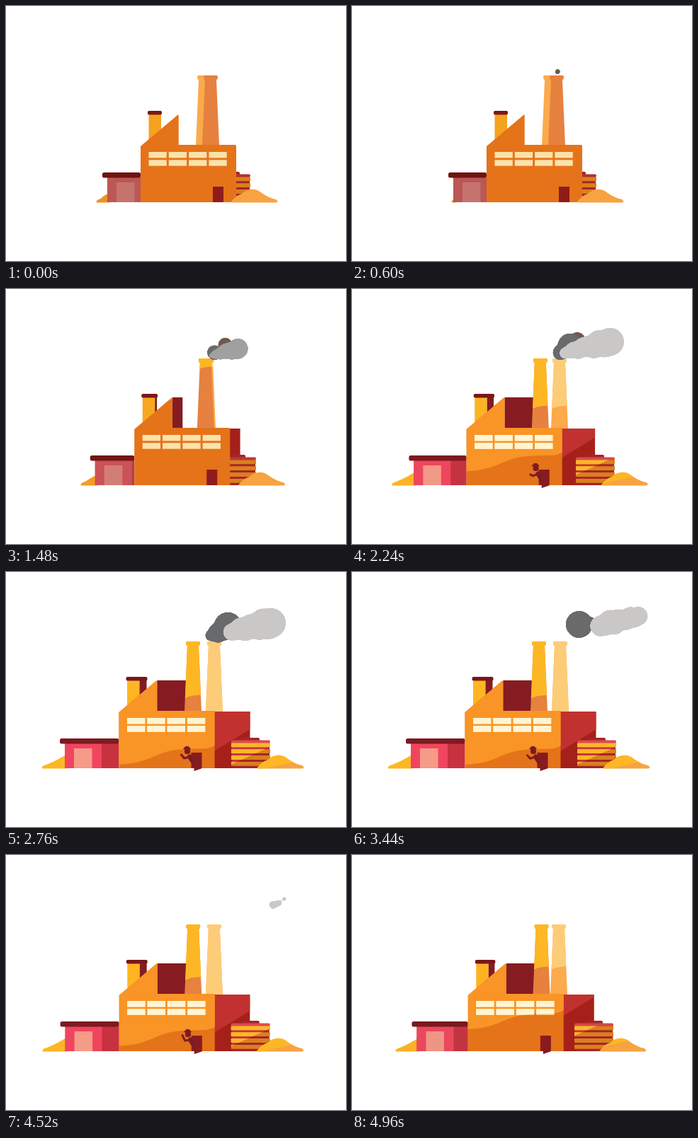
These frames come from a looping animation (480 px wide and 360 px high, 5 s). An HTML page with a canvas:

```html
<!DOCTYPE html>
<html lang="en">
<head>
<meta charset="utf-8">
<title>Factory</title>
<style>
html, body { margin: 0; width: 100%; height: 100%; overflow: hidden; background: #fff; }
canvas, svg { position: absolute; left: 0; top: 0; width: 480px; height: 360px; }
</style>
</head>
<body>
<canvas id="stage" width="480" height="360"></canvas>
<svg viewBox="0 0 480 360">
  <defs>
    <filter id="goo" filterUnits="userSpaceOnUse" x="240" y="20" width="240" height="110" color-interpolation-filters="sRGB">
      <feGaussianBlur stdDeviation="2"/>
      <feColorMatrix values="1 0 0 0 0  0 1 0 0 0  0 0 1 0 0  0 0 0 18 -8"/>
    </filter>
  </defs>
  <g id="brown" filter="url(#goo)" fill="#745750"></g>
  <g id="dark" filter="url(#goo)" fill="#696a6c"></g>
  <g id="light" filter="url(#goo)"></g>
</svg>
<script>
const LOOP = 5000;
const ctx = document.getElementById('stage').getContext('2d');

const clamp = v => Math.max(0, Math.min(1, v));
const mix = (a, b, k) => a + (b - a) * k;
const span = (t, a, b) => clamp((t - a) / (b - a));
const cubic = u => u < .5 ? 4 * u ** 3 : 1 - 4 * (1 - u) ** 3;
const smooth = u => u * u * (3 - 2 * u);

function blend(a, b, k) {
  const part = (c, i) => parseInt(c.slice(i, i + 2), 16);
  return `rgb(${[1, 3, 5].map(i => Math.round(mix(part(a, i), part(b, i), k)))})`;
}

function fill(d, color) {
  ctx.fillStyle = color;
  ctx.fill(new Path2D(d));
}

function box(x, y, w, h, color, r = 0) {
  if (w <= 0) return;
  ctx.fillStyle = color;
  ctx.beginPath();
  ctx.roundRect(x, y, w, h, r);
  ctx.fill();
}

// Shaded shape with its sunlit part above the given edge
function lit(d, dark, light, edge) {
  fill(d, dark);
  ctx.save();
  ctx.clip(new Path2D(edge));
  fill(d, light);
  ctx.restore();
}

const rect = (x, y, w, h) => `M${x} ${y}h${w}v${h}h${-w}Z`;
const slope = (x0, y0, x1, y1) => `M${x0} -200V${y0}L${x1} ${y1}V-200Z`;

function stack(c, dark, light, edgeY) {
  const d = `M${c - 9} 98H${c + 9}Q${c + 11} 100 ${c + 9} 104H${c + 8}L${c + 12} 197H${c - 12}` +
    `L${c - 8} 104H${c - 9}Q${c - 11} 100 ${c - 9} 98Z`;
  const edge = `M${c - 14} -200V${edgeY + 3}Q${c - 4} ${edgeY - 4} ${c + 14} ${edgeY - 3}V-200Z`;
  lit(d, dark, light, edge);
}

function garage(p, wall) {
  const x = mix(143, 83, p);
  box(x, 242, wall - x, 35, blend('#a8484b', '#c8313f', p));
  box(x, 242, Math.min(52, wall - x), 35, blend('#bb5755', '#f1455f', p));
  box(x + 13, 249, 25.5, 28, blend('#c5736d', '#f59b88', p));
  box(x - 7, 235, wall - x + 7, 7.5, blend('#6f1411', '#7d1a20', p), 2.5);
}

function barrels(p, drop) {
  const x = mix(291, 319, p);
  const edge = slope(x - 2, 272 - drop, x + 58, 245 - drop);
  box(x + 15, 234, 24, 6, '#a5252a', 2);
  box(x + 1, 262, 54, 15, '#a8232a');
  lit(rect(x, 238, 53, 32), '#a9242a', '#c8383c', edge);
  box(x - 1, 237.5, 55, 4, blend('#b42f30', '#dc4a50', p), 2);
  for (let i = 0; i < 4; i++)
    lit(rect(x - 1, 241.5 + i * 8.8, 55, 5.8), '#d9811b', '#fdb62a', edge);
}

function mound(p, drop) {
  const x = mix(0, 37, p);
  const d = `M${x + 319} 275Q${x + 324} 268 ${x + 333} 265C${x + 341} 257 ${x + 353} 257 ${x + 361} 264` +
    `Q${x + 371} 271 ${x + 381} 273Q${x + 386} 277 ${x + 381} 277.5H${x + 320}Q${x + 316} 277 ${x + 319} 275Z`;
  lit(d, '#f7a340', '#fdb724', slope(x + 312, 281 - drop / 2, x + 388, 264 - drop / 2));
}

function windows(x, edge) {
  for (let i = 0; i < 8; i++)
    lit(rect(x + 11.5 + i % 4 * 28.3, i < 4 ? 206 : 217.3, 25.3, 8.4), '#fbe2ab', '#fff5d4', edge);
}

function line(points, width, color) {
  ctx.strokeStyle = color;
  ctx.lineWidth = width;
  ctx.lineCap = ctx.lineJoin = 'round';
  ctx.beginPath();
  points.forEach(([x, y]) => ctx.lineTo(x, y));
  ctx.stroke();
}

function doorway(t, x) {
  const open = smooth(span(t, 1650, 2050));
  const out = smooth(span(t, 1800, 2350)) * (1 - smooth(span(t, 4450, 4950)));
  box(x, 255, 15, 22, '#8f1c1b');
  if (open <= 0) return;
  if (out > 0) {
    const skin = '#7c1c22', hx = x + 7 - 13 * out, wave = Math.sin((t - 2760) / 105);
    line([[x + 8, 275], [hx + 4, 261]], 7, skin);
    line([[hx + 3, 261], [hx - 4 * out, 263 + wave], [hx - 8 * out, 258 + 4 * wave]], 3, skin);
    box(hx - 3.5, 249, 8, 8, skin, 3.5);
    box(hx - 5, 248, 10, 2.5, skin, 1);
    box(hx - 3, 246, 6, 4, skin, 1);
  }
  const left = x + 4 * open, dip = 4 * open;
  fill(`M${left} ${255 + dip / 2}L${x + 14.5} 255V277.5L${left} ${277 + dip}Z`, '#861b20');
}

function factory(t) {
  const p = cubic(span(t, 500, 2860)) - cubic(span(t, 4220, 6480));
  const drop = 86 * (1 - p) ** .85;
  const x = mix(190, 159.5, p), r = x + 135, peak = x + 53.7, side = 50 * p;

  // Heap on the left tucks behind the shed before the turn
  const tuck = smooth(span(t, 0, 450)) * (1 - smooth(span(t, 620, 1100)));
  const heap = mix(128, 51, p) + 13 * tuck, shed = mix(146, 86, p);
  fill(`M${heap} 277.5Q${heap - 2} 274 ${heap + 6} 272Q${mix(heap, shed, .55)} 267 ${shed} ${mix(264, 257, p)}V277.5Z`,
    blend('#ec931f', '#fdb724', p));

  box(x + 11.5, 152, 17.5, 45, blend('#f4a31f', '#fdb622', p));
  box(x + 29, 152, 10 * p, 40, '#841b21');
  box(x + 10, 148, 20 + 10 * p, 5.5, '#7a1719', 2);
  garage(p, x);

  box(peak, 153, side, 44, '#861c21', 1);
  stack(mix(280, 294, p), '#fbaa4c', '#fdcc78', 177 - drop + 50 * span(p, .94, 1));
  stack(mix(289, 264, p), '#e6813f', '#fdb724', 177 - drop);

  const s = drop * 1.6;
  lit(rect(r - 1, 197, side + 1, 80), '#a52019', '#c13130', slope(r - 2, 254 - s, r + 52, 221 - s));
  barrels(p, drop);

  const edge = `M${x - 5} -200V${272 - s}C${x + 42} ${272 - s} ${x + 50} ${254 - s} ${x + 84} ${251 - s}` +
    `S${x + 122} ${253 - s} ${x + 138} ${244 - s}V-200Z`;
  lit(`M${x} 277V198L${peak - 1} 153.5Q${peak} 153 ${peak} 155V196H${r - 2}Q${r} 196 ${r} 198V277Z`,
    '#e57319', '#f99426', edge);
  windows(x, edge);
  mound(p, drop);
  doorway(t, x + 102);
}

// Each stream runs from its first puff to its last: birth, resting place, drift, size
// and how long the size holds before it shrinks
const streams = [
  { id: 'brown', count: 2,
    first: { born: 480, x: 318, y: 73, dx: 33, dy: -4, size: 12, hold: 1.2 },
    last: { born: 1900, x: 300, y: 76, dx: 60, dy: -18, size: 11, hold: 1 } },
  { id: 'dark', count: 3,
    first: { born: 1150, x: 314, y: 76, dx: 13, dy: -4, size: 20, hold: 3 },
    last: { born: 2200, x: 292, y: 86, dx: 52, dy: -16, size: 12, hold: 1 } },
  { id: 'light', count: 10,
    first: { born: 900, x: 374, y: 72, dx: 59, dy: -19, size: 21, hold: 1 },
    last: { born: 1900, x: 336, y: 78, dx: 33, dy: -7, size: 15, hold: 5 } }
];

for (const stream of streams) {
  stream.group = document.getElementById(stream.id);
  for (let i = 0; i < stream.count; i++)
    stream.group.append(document.createElementNS('http://www.w3.org/2000/svg', 'circle'));
}

function puff(t, { first, last }, i, s) {
  const at = key => mix(first[key], last[key], s);
  const rise = 1 - (1 - span(t, at('born'), at('born') + 1800)) ** 1.6;
  const drift = Math.min(1.25, Math.max(0, (t - 2760) / 1320));
  const fade = 1 - span(t, 2800, mix(4500, 4700, s)) ** mix(first.hold, last.hold, s ** 3);
  return {
    cx: mix(287, at('x'), rise) + at('dx') * drift,
    cy: mix(95, at('y'), rise) + at('dy') * drift + 3 * rise * Math.sin(i * 2.4),
    r: at('size') * Math.sqrt(rise) * fade
  };
}

function smoke(t) {
  for (const stream of streams)
    [...stream.group.children].forEach((dot, i) => {
      const shape = puff(t, stream, i, i / (stream.count - 1));
      for (const key in shape) dot.setAttribute(key, shape[key]);
    });
  document.getElementById('light').setAttribute('fill', blend('#9c9c9c', '#c9c8c7', span(t, 1400, 2200)));
}

function draw() {
  const t = performance.now() % LOOP;
  ctx.clearRect(0, 0, 480, 360);
  factory(t);
  smoke(t);
  requestAnimationFrame(draw);
}
draw();
</script>
</body>
</html>
```
